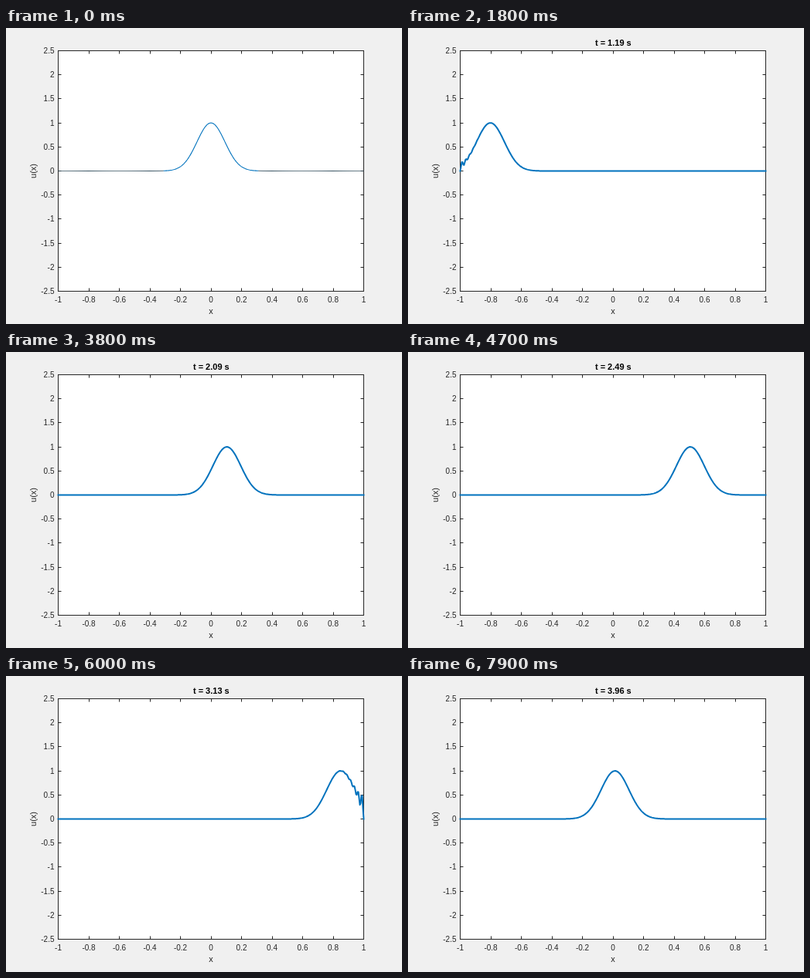
An HTML page with a canvas for the animation above (8 s loop, 512 by 384 pixels).

```html
<!DOCTYPE html>
<html lang="en">
<head>
<meta charset="utf-8">
<title>Travelling pulse between two walls</title>
<style>
  html, body { margin: 0; width: 100%; height: 100%; overflow: hidden; background: #f0f0f0; }
  canvas { display: block; width: 512px; height: 384px; }
</style>
</head>
<body>
<canvas id="stage" width="512" height="384"></canvas>
<script>
const ctx = document.getElementById('stage').getContext('2d');
const FONT = '"Liberation Sans", Arial, sans-serif';
const INK = '#262626';
const BLUE = '#0072bd';
const BOX = { left: 67.5, right: 462.5, top: 29.5, bottom: 341.5 };
const LOOP = 8000, STEP = 100, START = 200;
const SPEED = 1.0067, SHARPNESS = 60;

// Clock in ms against simulated seconds, linear in between
const PACE = [[200, 0.475], [1800, 1.19], [2600, 1.56], [3800, 2.09],
              [4700, 2.49], [6000, 3.13], [7900, 3.96]];

const px = x => 265 + x * 197.5;
const py = u => 185.5 - u * 62.4;

function simTime(ms) {
  let i = 1;
  while (i < PACE.length - 1 && ms > PACE[i][0]) i++;
  const [m0, t0] = PACE[i - 1], [m1, t1] = PACE[i];
  return t0 + (t1 - t0) * (ms - m0) / (m1 - m0);
}

const bell = d => Math.exp(-SHARPNESS * d * d);

// The pulse and its mirror images behind both walls
function pulse(x, t) {
  const s = SPEED * t;
  return bell(x + s) + bell(x + 2 - s) + bell(x - 4 + s);
}

// Grid ripples that pull the end values down to zero
function ripple(d, wall) {
  return wall * Math.exp(-d / 0.035) * (1 + Math.cos(2 * Math.PI * d / 0.0245)) / 2;
}

function wave(x, t) {
  return pulse(x, t) - ripple(1 + x, pulse(-1, t)) - ripple(1 - x, pulse(1, t));
}

function line(x0, y0, x1, y1) {
  ctx.beginPath();
  ctx.moveTo(x0, y0);
  ctx.lineTo(x1, y1);
  ctx.stroke();
}

function text(str, x, y, size, align = 'center', weight = 'normal') {
  ctx.font = `${weight} ${size}px ${FONT}`;
  ctx.textAlign = align;
  ctx.fillText(str, x, y);
}

function drawAxes() {
  const { left, right, top, bottom } = BOX;
  ctx.fillStyle = '#f0f0f0';
  ctx.fillRect(0, 0, 512, 384);
  ctx.fillStyle = '#fff';
  ctx.fillRect(left, top, right - left, bottom - top);
  ctx.strokeStyle = ctx.fillStyle = INK;
  ctx.lineWidth = 1;
  ctx.lineJoin = 'miter';
  ctx.strokeRect(left, top, right - left, bottom - top);

  for (let i = -5; i <= 5; i++) {
    const x = Math.floor(px(i / 5)) + 0.5;
    line(x, bottom, x, bottom - 4);
    line(x, top, x, top + 4);
    text(String(i / 5), px(i / 5), 356, 10);

    const y = Math.floor(py(i / 2)) + 0.5;
    line(left, y, left + 4, y);
    line(right, y, right - 4, y);
    text(String(i / 2), 62.5, y + 3.5, 10, 'right');
  }

  text('x', 265, 371, 11);
  ctx.save();
  ctx.translate(39, 185.5);
  ctx.rotate(-Math.PI / 2);
  text('u(x)', 0, 0, 11);
  ctx.restore();
}

function drawCurve(from, to, color, width, f) {
  const n = Math.round((to - from) * 200);
  ctx.strokeStyle = color;
  ctx.lineWidth = width;
  ctx.lineJoin = 'round';
  ctx.beginPath();
  for (let i = 0; i <= n; i++) {
    const x = from + (to - from) * i / n;
    ctx.lineTo(px(x), py(f(x)));
  }
  ctx.stroke();
}

function draw(ms) {
  drawAxes();
  if (ms < START) {
    drawCurve(-1, -0.31, '#35505f', 1, bell);
    drawCurve(0.31, 1, '#35505f', 1, bell);
    drawCurve(-0.31, 0.31, BLUE, 1.1, bell);
    return;
  }
  const t = simTime(Math.floor(ms / STEP) * STEP);
  ctx.fillStyle = '#000';
  text(`t = ${t.toFixed(2)} s`, 265.3, 23, 11, 'center', 'bold');
  ctx.lineCap = 'square';
  drawCurve(-1, 1, BLUE, 2, x => wave(x, t));
  ctx.lineCap = 'butt';
}

const begin = performance.now();
function tick() {
  draw((performance.now() - begin) % LOOP);
  requestAnimationFrame(tick);
}
tick();
</script>
</body>
</html>
```
